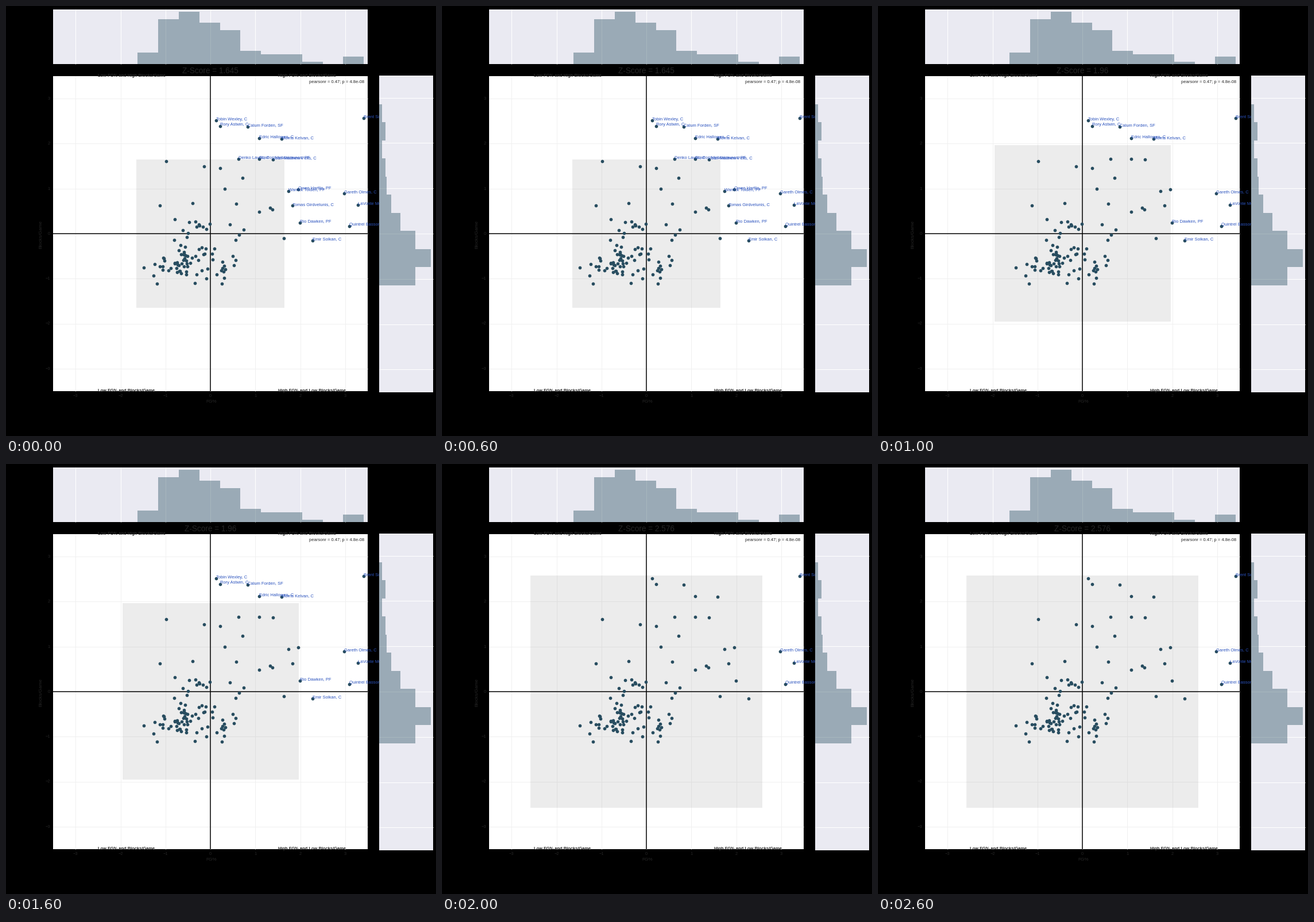
These frames come from a looping animation (749x748 px, 3 s). A matplotlib script:

```python
import matplotlib.pyplot as plt
import numpy as np
from matplotlib.animation import FuncAnimation
from matplotlib.patches import Rectangle

W, H, DPI = 749, 748, 64
CX, CY, UNIT = 356.1, 395.9, 78.3  # data origin and pixels per unit
LIMIT = 3.5
INK, SLATE, BLUE = "#262626", "#284d60", "#2a52be"
PANEL, BAR = "#eaeaf2", "#244a5c"
SMALL, LABEL, TITLE = 7.5, 8.2, 13.6
Z_SCORES = [1.645, 1.96, 2.576]

PLAYERS = [
    (0.13, 2.51, "Tobin Wexley, C"),
    (0.21, 2.39, "Rory Astwin, C"),
    (0.835, 2.37, "Calum Forden, SF"),
    (1.08, 2.12, "Edric Hallowen, C"),
    (1.58, 2.1, "Morris Kelvan, C"),
    (0.625, 1.665, "Denko Lavric, C"),
    (1.08, 1.665, "Stavros Melidakounos, PF"),
    (1.385, 1.65, "Jean-Matthew Pells, C"),
    (1.73, 0.95, "Warrick Tolden, PF"),
    (1.955, 0.98, "Owen Hartlin, PF"),
    (1.825, 0.62, "Tomas Girdvelunis, C"),
    (1.99, 0.245, "Rio Dawken, PF"),
    (2.27, -0.155, "Emir Solkan, C"),
    (2.98, 0.89, "Gareth Olmes, C"),
    (3.285, 0.64, "LaVonte Mercer, C"),
    (3.095, 0.17, "Quintrel Bassomy, C"),
    (3.415, 2.57, "Brent Soliva, C"),
]
OUTLIERS = [
    (-0.99, 1.61), (-0.14, 1.49), (0.21, 1.45), (0.72, 1.24),
    (0.32, 0.99), (-0.4, 0.68), (-1.12, 0.62), (0.57, 0.66),
    (1.33, 0.57), (1.38, 0.54), (1.09, 0.48), (1.63, -0.1),
]
# Size, centre and spread of each group of unlabelled players
CLOUDS = [
    (56, (-0.58, -0.62), (0.36, 0.24)),
    (18, (0.28, -0.55), (0.22, 0.28)),
    (14, (0.0, 0.2), (0.45, 0.16)),
]

plt.rcParams["font.family"] = "Liberation Sans"
fig = plt.figure(figsize=(W / DPI, H / DPI), dpi=DPI, facecolor="black")
ax = fig.add_axes([0, 0, 1, 1])
ax.set_xlim(0, W)
ax.set_ylim(H, 0)
ax.axis("off")


def pt(px):
    return px * 72 / DPI


def px(x, y):
    return CX + x * UNIT, CY - y * UNIT


def rect(x0, y0, x1, y1, color, z, **kw):
    patch = Rectangle((x0, y0), x1 - x0, y1 - y0, fc=color, lw=0, zorder=z, **kw)
    return ax.add_patch(patch)


def line(xs, ys, color, width, z):
    ax.plot(xs, ys, color=color, lw=pt(width), zorder=z, solid_capstyle="butt")


def text(x, y, s, size=SMALL, color=INK, ha="left", va="baseline", **kw):
    return ax.text(x, y, s, fontsize=pt(size), color=color, ha=ha, va=va,
                   zorder=5, **kw)


def scatter_points():
    rng = np.random.default_rng(7)
    points = [p[:2] for p in PLAYERS] + OUTLIERS
    for n, centre, spread in CLOUDS:
        cloud = rng.normal(centre, spread, (n, 2))
        points += list(np.clip(cloud, (-1.61, -1.13), (1.6, 0.45)))
    return [px(x, y) for x, y in points]


def draw_main():
    left, top = px(-LIMIT, LIMIT)
    right, bottom = px(LIMIT, -LIMIT)
    rect(left, top, right, bottom, "white", 1)
    for k in range(-3, 4):
        x, y = px(k, k)
        line([x, x], [top, bottom], "#f0f0f0", 1, 1.5)
        line([left, right], [y, y], "#f0f0f0", 1, 1.5)
        name = str(k).replace("-", "\u2212")
        text(x, 678.3, name, ha="center", va="center")
        text(77, y + 0.5, name, ha="right", va="center")
    line([CX, CX], [top, bottom], "black", 1.5, 3)
    line([left, right], [CY, CY], "black", 1.5, 3)
    ax.scatter(*zip(*scatter_points()), s=pt(5.7) ** 2, c=SLATE, lw=0, zorder=4)

    for x, y, s in [
        (-2.5, LIMIT, "Low FG% and High Blocks/Game"),
        (1.5, LIMIT, "High FG% and Blocks/Game"),
        (-2.5, -LIMIT, "Low FG% and Blocks/Game"),
        (1.5, -LIMIT, "High FG% and Low Blocks/Game"),
    ]:
        x, y = px(x, y)
        text(x, y + 1, s, weight="bold")
    text(624, 134.3, "pearsonr = 0.47; p = 4.8e-08", ha="right")
    text(358, 688.5, "FG%", LABEL, ha="center", va="center")
    text(61, 397, "Blocks/Game", LABEL, ha="center", va="center", rotation=90)


def draw_top_hist():
    top, base, x0, step = 6, 100.5, 229.3, 35.8
    rect(82, top, 630, base, PANEL, 1)
    for k in range(-3, 4):
        x = CX + k * UNIT
        line([x, x], [top, base], "white", 1, 1.5)
    for i, n in enumerate([6, 24, 28, 22, 18, 7, 5, 5, 1, 0, 4]):
        x = x0 + i * step
        rect(x, base - 3.24 * n, x + step, base, BAR, 2, alpha=0.4, snap=True)


def draw_side_hist():
    # Sits above the scatter so it cuts off the long labels
    base, right, y0, step = 650, 744, 170.7, 31.5
    rect(base, 121, right, 672, PANEL, 6)
    for k in range(-3, 4):
        y = CY - k * 78.8
        line([base, right], [y, y], "white", 1, 6.5)
    for i, n in enumerate([2, 4, 2, 4, 5, 8, 14, 24, 34, 24]):
        y = y0 + i * step
        rect(base, y, base + 2.64 * n, y + step, BAR, 7, alpha=0.4, snap=True)


draw_main()
draw_top_hist()
draw_side_hist()
box = rect(CX, CY, CX, CY, "gray", 2, alpha=0.15)
title = text(CX, 117.2, "", TITLE, ha="center")
labels = []
for x, y, name in PLAYERS:
    lx, ly = px(x, y)
    labels.append(text(lx, ly - 0.8, name, color=BLUE))


def update(i):
    z = Z_SCORES[i]
    half = z * UNIT
    box.set_bounds(CX - half, CY - half, 2 * half, 2 * half)
    title.set_text(f"Z-Score = {z}")
    for label, (x, y, _) in zip(labels, PLAYERS):
        label.set_visible(max(x, y) > z)
    return [box, title, *labels]


anim = FuncAnimation(fig, update, frames=len(Z_SCORES), interval=1000,
                     repeat=True, repeat_delay=0)
plt.show()
```
